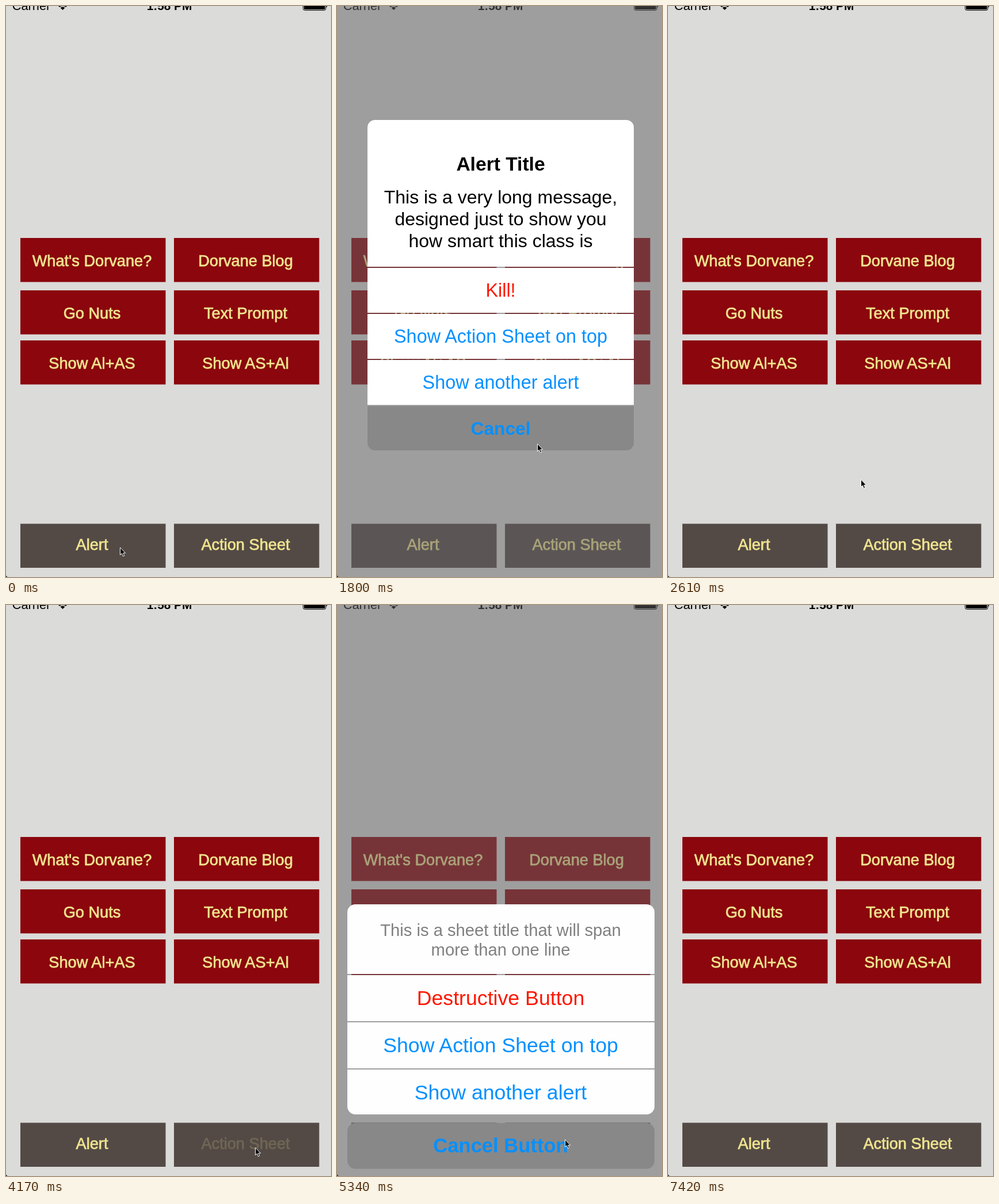
An HTML page that plays this animation: 565 by 992 pixels, repeating every 7980 ms.

```html
<!DOCTYPE html>
<html lang="en">
<head>
<meta charset="utf-8">
<title>Alert and action sheet</title>
<style>
html, body { margin: 0; width: 100%; height: 100%; overflow: hidden; background: #dbdbd9; }
svg { display: block; width: 100vw; height: 100vh; }
text { font-family: "Liberation Sans", Arial, Helvetica, sans-serif; text-anchor: middle; }
.label { font-size: 27.2px; fill: #f0e48f; stroke: #f0e48f; stroke-width: .75px; }
.bold { font-weight: 700; }
</style>
</head>
<body>
<svg id="stage" viewBox="0 0 565 992" preserveAspectRatio="none">
  <defs>
    <clipPath id="alertClip"><rect x="53" y="198" width="463" height="574" rx="13"/></clipPath>
    <clipPath id="sheetClip"><rect x="18" y="520" width="534" height="365" rx="14"/></clipPath>
  </defs>
  <rect width="565" height="992" fill="#dbdbd9"/>
  <g id="status">
    <text x="44" y="7" font-size="21.8">Carrier</text>
    <path d="M91 0Q98.500 -5 106 0L104 2Q98.500 -2 93 2ZM94.500 3Q98.500 0 102.500 3L98.500 7Z"/>
    <text x="284" y="7" font-size="20.8" class="bold">1:58 PM</text>
    <rect x="516.500" y="-12" width="39.500" height="19.500" rx="3" fill="none" stroke="#000"/>
    <rect x="518" y="-10" width="36.500" height="16" rx="1.500"/>
    <path d="M557 -5Q560 -1 557 3Z"/>
  </g>
  <g id="buttons"></g>
  <rect id="dim" width="565" height="992" fill="#656265"/>
  <g id="alert"></g>
  <g id="sheet"></g>
  <path d="M0 988Q0 992 4 992H0Z"/>
  <path id="cursor" d="M.5 .8V13.600L3.400 11 5.500 16 7.700 15 5.700 10.300H9.600Z" stroke="#fff" stroke-width="1" stroke-linejoin="round"/>
</svg>
<script>
const LOOP = 7980, CENTER = 284.5;
const BLUE = '#0490ff', RED = '#ff1500', PRESSED = '#888';
const $ = id => document.getElementById(id);

function add(parent, tag, attrs, content) {
  const el = document.createElementNS('http://www.w3.org/2000/svg', tag);
  for (const k in attrs) el.setAttribute(k, attrs[k]);
  if (content) el.textContent = content;
  return parent.appendChild(el);
}
const box = (parent, x, y, width, height, fill, rx = 0) =>
  add(parent, 'rect', { x, y, width, height, fill, rx });
const line = (parent, content, y, size, fill, cls = '') =>
  add(parent, 'text', { x: CENTER, y, 'font-size': size, fill, class: cls }, content);

function button(content, col, y, fill, baseline) {
  const x = 25 + 267 * col;
  box($('buttons'), x, y, 252.5, 76.5, fill);
  return add($('buttons'), 'text', { x: x + 124.5, y: y + baseline, class: 'label' }, content);
}
const rows = { 403: ["What's Dorvane?", 'Dorvane Blog'], 494: ['Go Nuts', 'Text Prompt'], 581: ['Show Al+AS', 'Show AS+Al'] };
for (const y in rows) rows[y].forEach((s, col) => button(s, col, +y, '#8b060d', 49));
const [alertLabel, sheetLabel] = ['Alert', 'Action Sheet']
  .map((s, col) => button(s, col, 899.5, '#534a46', 45.5));

// Cells are split by thin gaps that let the page show through.
const alert = $('alert');
const alertCells = add(alert, 'g', { 'clip-path': 'url(#alertClip)' });
box(alertCells, 53, 198, 463, 255, '#fff');
line(alert, 'Alert Title', 286, 33.6, '#000', 'bold');
['This is a very long message,', 'designed just to show you', 'how smart this class is']
  .forEach((s, i) => line(alert, s, 343 + 38 * i, 32, '#000'));
['Kill!', 'Show Action Sheet on top', 'Show another alert'].forEach((s, i) => {
  box(alertCells, 53, 455 + 80 * i, 463, 78, '#fff');
  line(alert, s, 504.5 + 80 * i, 32.4, i ? BLUE : RED);
});
const alertCancel = box(alertCells, 53, 695, 463, 77, '#fff');
line(alert, 'Cancel', 745, 31.7, BLUE, 'bold');

const sheet = $('sheet');
const sheetCells = add(sheet, 'g', { 'clip-path': 'url(#sheetClip)' });
box(sheetCells, 18, 520, 534, 121, '#fefefe');
['This is a sheet title that will span', 'more than one line']
  .forEach((s, i) => line(sheet, s, 575 + 34 * i, 29.2, '#808080'));
['Destructive Button', 'Show Action Sheet on top', 'Show another alert'].forEach((s, i) => {
  box(sheetCells, 18, 643 + 82 * i, 534, 80, '#fefefe');
  line(sheet, s, 695 + 82 * i, 35.7, i ? BLUE : RED);
});
const sheetCancel = box(sheet, 18, 900, 534, 79.5, '#fefefe', 14);
line(sheet, 'Cancel Button', 951, 34.6, BLUE, 'bold');

// Progress from 0 to 1 in n even jumps, the first at a and the last at b.
function steps(t, a, b, n) {
  if (t < a) return 0;
  return Math.min(n, 1 + Math.floor((t - a) / (b - a) * (n - 1) + 1e-6)) / n;
}
const within = (t, a, b) => t >= a && t < b;
const linear = p => p;
const easeOut = p => 1 - (1 - p) ** 3;
const smooth = p => p * p * (3 - 2 * p);
const backOut = p => 1 + 1.725 * (p - 1) ** 3 + .725 * (p - 1) ** 2;

// Each move is a Bezier curve that starts where the one before it ends.
const home = [198, 940];
const moves = [
  { time: [60, 61, 1], ease: linear, path: [[198, 946]] },
  { time: [240, 420, 4], ease: linear, path: [[180, 966], [142, 928]] },
  { time: [1110, 1620, 4], ease: linear, path: [[310, 780], [348, 760]] },
  { time: [2220, 2610, 4], ease: linear, path: [[335, 822]] },
  { time: [2790, 3390, 9], ease: easeOut, path: [[345, 1000], [433, 942]] },
  { time: [4980, 5100, 2], ease: linear, path: [[412, 890], [396, 928]] },
  { time: [6480, 7420, 17], ease: linear, path: [[330, 608], [700, 608], [470, 1004]] },
];
function bezier(points, p) {
  if (points.length === 1) return points[0];
  return bezier(points.slice(1).map((b, i) => b.map((v, j) => points[i][j] + (v - points[i][j]) * p)), p);
}
function pointer(t) {
  return moves.reduce((from, { time, ease, path }) =>
    t < time[0] ? from : bezier([from, ...path], ease(steps(t, ...time))), home);
}

function draw(t) {
  const alertIn = steps(t, 870, 1320, 3), alertOut = steps(t, 2220, 2610, 4);
  const sheetIn = steps(t, 4380, 4800, 3), sheetOut = steps(t, 5820, 6060, 3);
  const alertDim = Math.min(1, alertIn * 1.5) * (1 - alertOut);
  const sheetDim = Math.min(1, sheetIn * 1.5) * (1 - sheetOut ** 6);
  const drop = 480 * (1 - backOut(sheetIn) + sheetOut ** 2);
  const scale = .9 + .1 * easeOut(alertIn);
  const [x, y] = pointer(t).map(Math.round);

  $('cursor').setAttribute('transform', `translate(${x} ${y})`);
  $('dim').setAttribute('opacity', .5 * (alertDim + sheetDim));
  alert.setAttribute('opacity', smooth(alertIn) * (1 - alertOut));
  alert.setAttribute('transform',
    `translate(${CENTER} 485) scale(${scale}) translate(${-CENTER} -485)`);
  sheet.setAttribute('transform', `translate(0 ${drop})`);
  sheet.setAttribute('visibility', drop > 479 ? 'hidden' : 'visible');
  alertCancel.setAttribute('fill', within(t, 1800, 2220) ? PRESSED : '#fff');
  sheetCancel.setAttribute('fill', within(t, 5340, 5820) ? PRESSED : '#fefefe');
  alertLabel.setAttribute('opacity', within(t, 780, 870) ? .18 : 1);
  sheetLabel.setAttribute('opacity', within(t, 4170, 4290) ? .18 : 1);
}

const start = performance.now();
function tick() {
  draw((performance.now() - start) % LOOP);
  requestAnimationFrame(tick);
}
tick();
</script>
</body>
</html>
```
